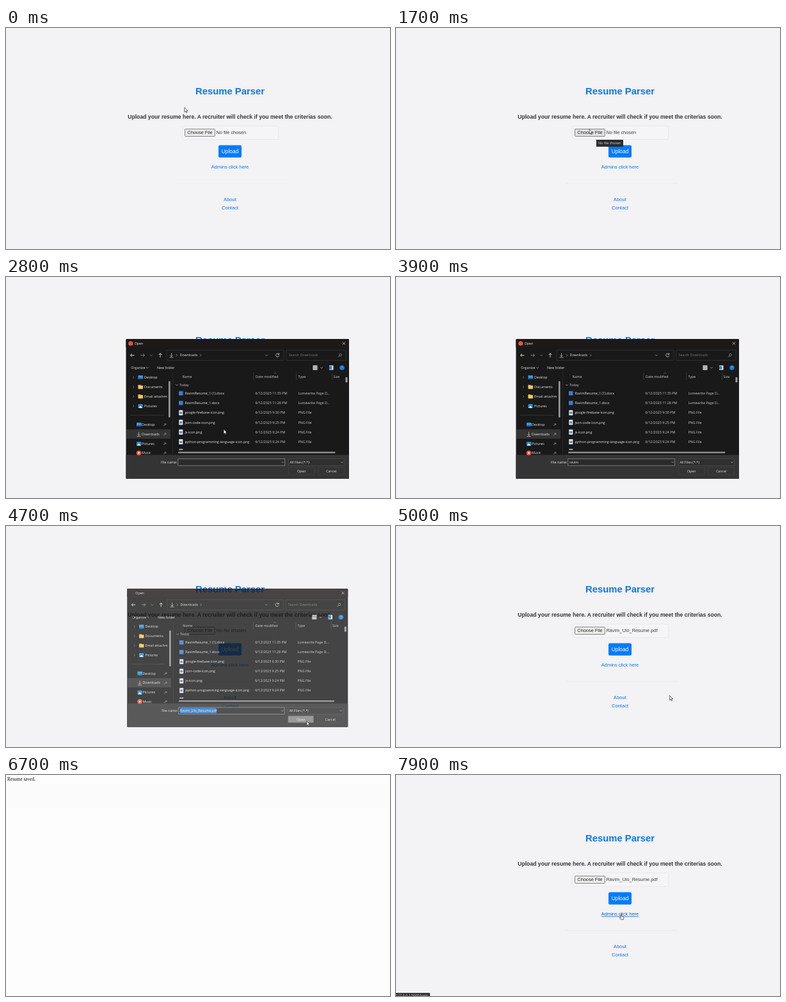
Recreate the animation shown at these times as an HTML page. Size 600 by 346 pixels, loop 8000 ms.

```html
<!DOCTYPE html>
<html lang="en">
<head>
<meta charset="utf-8">
<title>Resume Parser</title>
<style>
html, body { margin: 0; width: 100%; height: 100%; overflow: hidden; background: #f3f2f4; }
svg { display: block; width: 100vw; height: 100vh; }
.arial { font-family: "Liberation Sans", Arial, sans-serif; }
.ui { font-family: "Open Sans", "Noto Sans", sans-serif; font-size: 5.35px; }
.serif { font-family: "Liberation Serif", serif; }
text { white-space: pre; }
</style>
</head>
<body>
<svg id="stage" viewBox="0 0 600 346"></svg>
<script>
const LOOP = 8000, STEP = 100;
const FILE = 'Ravim_Ulo_Resume.pdf', TYPED = 'ravim';
const BLUE = '#0a78ee';

const attrs = o => Object.entries(o).map(([k, v]) => ` ${k}="${v}"`).join('');
const text = (x, y, s, o = {}) => `<text x="${x}" y="${y}"${attrs(o)}>${s}</text>`;
const rect = (x, y, w, h, fill, o = {}) =>
  `<rect x="${x}" y="${y}" width="${w}" height="${h}" fill="${fill}"${attrs(o)}/>`;
const line = (d, stroke, w = .6) => `<path d="${d}" fill="none" stroke="${stroke}" stroke-width="${w}"/>`;
const group = (id, body, o = {}) => `<g id="${id}"${attrs(o)}>${body}</g>`;
const circle = (x, y, r, fill) => `<circle cx="${x}" cy="${y}" r="${r}" fill="${fill}"/>`;
const right = (x, y, c = '#bbb') => line(`M${x - 1} ${y - 2}l2 2-2 2`, c);
const down = (x, y, c = '#bbb') => line(`M${x - 2} ${y - 1}l2 2 2-2`, c);

function page() {
  const mid = (y, s, size, o = {}) =>
    text(350, y, s, { 'text-anchor': 'middle', 'font-size': size, fill: BLUE, ...o });
  return rect(0, 0, 600, 346, '#f3f2f4') +
    mid(103.5, 'Resume Parser', 14.85, { 'font-weight': 700 }) +
    mid(142, 'Upload your resume here. A recruiter will check if you meet the criterias soon.',
      8.65, { 'font-weight': 700, fill: '#333336' }) +
    rect(275.7, 153.5, 150, 21, '#f5f4f6', { rx: 2, stroke: '#e3e2e5', 'stroke-width': .6 }) +
    rect(279.6, 158.2, 46.8, 11.4, '#efefef', { id: 'choose', rx: 1, stroke: '#606063', 'stroke-width': .8 }) +
    text(283.3, 166.4, 'Choose File', { 'font-size': 7.4, fill: '#222' }) +
    text(328.4, 166.4, '', { id: 'chosen', 'font-size': 7.4, fill: '#3c3c40' }) +
    rect(332, 183.5, 36, 19.3, '#007bff', { id: 'upload', rx: 2.2 }) +
    mid(195.6, 'Upload', 8.45, { fill: '#fff' }) +
    mid(220.4, 'Admins click here', 7.45, { id: 'admins' }) +
    line('M265 243.2H440', '#e5e4e7') +
    mid(270.7, 'About', 7.6) + mid(284, 'Contact', 7.6);
}

function folderIcon(kind, x, y) {
  return {
    desktop: () => rect(x - 3.5, y - 3, 7.5, 6, '#2f9be0', { rx: .8 }) + rect(x - 3.5, y + 1, 7.5, 2, '#1766ad', { rx: .5 }),
    folder: () => rect(x - 3.5, y - 3.2, 4, 3, '#d89a2b', { rx: .5 }) + rect(x - 3.5, y - 2.2, 7.5, 5.4, '#f4c659', { rx: .6 }),
    pictures: () => rect(x - 3.5, y - 3, 7.2, 6.3, '#258ee0', { rx: .8 }) + `<path d="M${x - 3} ${y + 3}l3-3.5 3.2 3.5z" fill="#e8f4ff"/>`,
    downloads: () => line(`M${x} ${y - 3.5}v5.5m-2.2-2l2.2 2.2 2.2-2.2M${x - 3} ${y + 3.5}h6`, '#bbb', .8),
    music: () => circle(x, y, 3.8, '#e9593f') + circle(x, y, 1.4, '#ffe0d5')
  }[kind]();
}

function navPane() {
  const item = (kind, name, y, pinned) => folderIcon(kind, pinned ? 207.5 : 210, y) +
    text(pinned ? 212 : 216, y + 1.9, name) +
    (pinned ? line(`M246.3 ${y + 2}l2-2m-1-1.5l2.5 2.5m-1.2-3l2 2`, '#aaa', .8) : right(199, y, '#888'));
  return rect(188, 238.5, 69, 14.6, '#343434') +
    item('desktop', 'Desktop', 157) + item('folder', 'Documents', 172) +
    item('folder', 'Email attachm', 187) + item('pictures', 'Pictures', 202) +
    line('M194 216.3H247', '#444') +
    item('desktop', 'Desktop', 231, true) + item('downloads', 'Downloads', 246, true) +
    item('pictures', 'Pictures', 261, true) + item('music', 'Music', 275.5, true) +
    rect(254, 163, 2.6, 57, '#9a9a9a', { rx: 1.3 });
}

function fileList() {
  const doc = 'Lumewrite Page D...', png = 'PNG File';
  const rows = [
    ['RavimResume_1 (1).docx', '11:35', doc], ['RavimResume_1.docx', '11:28', doc],
    ['google-firebase-icon.png', '9:30', png], ['json-code-icon.png', '9:25', png],
    ['js-icon.png', '9:24', png], ['python-programming-language-icon.png', '9:24', png]
  ];
  const icon = (type, y) => type === doc
    ? rect(270, y - 3.3, 6.6, 6.6, '#3d7bcb')
    : rect(270.3, y - 4, 6, 8, '#eee', { rx: .5 }) + rect(271.5, y - 1.4, 3.6, 3.2, '#3d83cc');
  return down(267, 169) + text(271, 171, 'Today', { fill: '#ccc' }) +
    rows.map(([name, time, type], i) => {
      const y = 182 + i * 15.2;
      return icon(type, y) + text(279.4, y + 1.9, name) +
        text(389.5, y + 1.9, `6/12/2023 ${time} PM`, { fill: '#ccc' }) +
        text(456.5, y + 1.9, type, { fill: '#ccc' });
    }).join('') +
    rect(270.3, 269.3, 6, 1.4, '#ddd') +
    rect(530.5, 157, 3, 8, '#9a9a9a');
}

function toolbar() {
  return rect(251, 114.5, 183, 16, '#191919', { stroke: '#3c3c3c', 'stroke-width': .6 }) +
    rect(438, 114.5, 93, 16, '#191919', { stroke: '#3c3c3c', 'stroke-width': .6 }) +
    line('M200.5 122.5h-6m2.5-2.5l-2.5 2.5 2.5 2.5', '#ddd', .9) +
    line('M210.5 122.5h6m-2.5-2.5l2.5 2.5-2.5 2.5', '#888', .9) +
    down(227, 122.5, '#aaa') +
    line('M241 126v-6.5m-2.5 2.5l2.5-2.5 2.5 2.5', '#ddd', .9) +
    folderIcon('downloads', 258.5, 122.5) + right(266.7, 122.5) +
    text(271.5, 124.4, 'Downloads') + right(304, 122.5) + down(407, 122.5) +
    line('M426.4 121a2.6 2.6 0 1 0 .3 2.4M426.8 119.3v2h-2', '#ddd', .8) +
    text(441.5, 124.4, 'Search Downloads', { fill: '#777' }) +
    `<circle cx="522.5" cy="122" r="1.8" fill="none" stroke="#aaa" stroke-width=".7"/>` + line('M521 123.5l-2 2', '#aaa', .7) +
    text(195.3, 144, 'Organize') + down(221, 142) + text(236, 144, 'New folder') +
    rect(479.5, 138.5, 7, 7, '#ddd') + line('M480 140.8h6m-6 2.4h6', '#333') + down(493, 142);
}

function bottomControls() {
  const button = (x, w, name, id) => rect(x, 298, w, 11, '#333', { id, stroke: '#484848', 'stroke-width': .5 }) +
    text(x + w / 2, 305.8, name, { 'text-anchor': 'middle' });
  return text(242, 291.8, 'File name:') +
    rect(268.8, 284.8, 167, 10.4, '#2b2b2b', { stroke: '#999', 'stroke-width': .7 }) +
    rect(270.8, 286, 57.5, 8, '#2b7cd3', { id: 'selection' }) +
    text(271.2, 291.8, '', { id: 'fileName' }) + down(432.5, 290) +
    rect(441.5, 284.8, 87, 10.4, '#2f2f2f', { stroke: '#555', 'stroke-width': .5 }) +
    text(443.5, 291.8, 'All Files (*.*)') + down(525, 290) +
    button(441.5, 40.5, 'Open', 'openButton') + button(488, 40.5, 'Cancel', 'cancelButton');
}

function dialog() {
  const blanks = [[187.5, 110.5, 348.5, 24.5], [242, 286, 25.3, 7.3], [269, 285, 167, 10],
    [441.5, 285, 87, 10], [441.5, 297.7, 40.5, 12.3], [487.5, 297.7, 41, 12.3], [528, 308, 8, 6]];
  return rect(187.5, 97, 348.5, 219, '#191919', { rx: 1.5 }) +
    rect(187.5, 97, 348.5, 13.5, '#1e1919', { rx: 1.5 }) +
    rect(187.5, 278.5, 348.5, 37.5, '#343434', { rx: 1.5 }) +
    group('titleIcon', circle(194.7, 104, 3.6, '#e2593f')) +
    text(200.7, 106, 'Open') +
    line('M525.8 101.7l4.4 4.4m0-4.4l-4.4 4.4', '#ccc', .7) +
    rect(505, 138.5, 6.5, 7, '#eee') + rect(505, 139.5, 4.3, 5, '#2f7fc4') +
    circle(525, 142, 3.8, '#1878d8') +
    text(525, 144, '?', { 'text-anchor': 'middle' }) +
    line('M260.5 149V278', '#303030') + line('M387 149.5v11.5M453.7 149.5v11.5M509.5 149.5v11.5', '#4a4a4a') +
    line('M418.5 151.5l2-1.7 2 1.7', '#999', .5) +
    text(275.5, 157.7, 'Name', { fill: '#ccc' }) + text(390, 157.7, 'Date modified', { fill: '#ccc' }) +
    text(456.5, 157.7, 'Type', { fill: '#ccc' }) + text(511.5, 157.7, 'Size', { fill: '#ccc' }) +
    rect(269, 273.6, 245.5, 2.4, '#8c8c8c', { rx: 1 }) +
    text(380.5, 174.2, 'Working on it...', { id: 'working' }) +
    group('controls', toolbar() + bottomControls()) +
    group('nav', navPane()) + group('files', fileList()) +
    group('blanks', blanks.map(b => rect(...b, '#fff')).join(''));
}

const stage = document.getElementById('stage');
stage.innerHTML =
  group('page', page(), { class: 'arial' }) +
  group('tooltip', rect(313, 175, 42, 10.8, '#2a2a2c') +
    text(316, 182.3, 'No file chosen', { fill: '#ddd' }), { class: 'ui' }) +
  group('dialog', dialog(), { class: 'ui', fill: '#e6e6e6' }) +
  group('saved', rect(0, 0, 600, 346, '#fefdfe') + rect(0, 14, 600, 38, '#fcfbfc') +
    text(2, 9, 'Resume saved.', { 'font-size': 7.35, fill: '#111' }), { class: 'serif' }) +
  group('status', rect(0, 341.2, 53, 5, '#2a2a2c') +
    text(0, 346.6, '127.0.0.1:5000/login', { fill: '#ddd' }), { class: 'ui' }) +
  group('arrow', '<path d="M0 0V7.2L1.7 5.7 2.8 8.1 4 7.6 2.9 5.2H5z" fill="#fff" stroke="#222" stroke-width=".7"/>') +
  group('beam', line('M-1.6-4H1.6M0-4V4M-1.6 4H1.6', '#222', .8)) +
  group('hand', '<path d="M-.8-3.8q.8-.8 1.4 0v3l2.6.6q1 .3.8 1.4l-.6 3H-.8l-2-3q.2-1 1.2-.4l.8.6z" fill="#fff" stroke="#222" stroke-width=".7"/>');

const el = {};
stage.querySelectorAll('[id]').forEach(e => el[e.id] = e);

// Pointer stops: time, x, y
const path = [
  [0, 279, 124.5], [100, 279, 124.5], [200, 280, 125], [500, 280, 125], [1300, 302, 158.5], [2000, 302, 158.5],
  [2300, 350.3, 187], [2500, 350.3, 187], [3100, 330, 290], [4400, 400, 284], [4600, 469.8, 305.5],
  [4800, 469.8, 305.5], [5300, 350, 192], [5600, 350, 192], [6000, 22.5, 5], [6200, 22.5, 5],
  [6600, 8, -12], [7400, 8, -12], [7800, 352, 222], [8000, 352, 222]
];

function pointerAt(t) {
  const i = path.findIndex(p => p[0] > t);
  const [t0, x0, y0] = path[i - 1], [t1, x1, y1] = path[i];
  const u = (t - t0) / (t1 - t0), k = u * u * (3 - 2 * u);
  return [x0 + (x1 - x0) * k, y0 + (y1 - y0) * k];
}

const show = (name, on) => el[name].setAttribute('display', on ? 'inline' : 'none');
const fill = (name, color) => el[name].setAttribute('fill', color);

function render(time) {
  const t = Math.floor(time % LOOP / STEP) * STEP;
  const within = (a, b) => t >= a && t < b;
  const [x, y] = pointerAt(t);
  const over = (a, b, c, d) => x >= a && x <= c && y >= b && y <= d;

  const saved = within(5600, 7400), open = within(2300, 4800);
  const picked = t >= 4400, closing = t >= 4700;

  show('saved', saved);
  show('tooltip', within(1500, 2100));
  el.chosen.textContent = t >= 4800 ? FILE : 'No file chosen';
  fill('choose', !open && over(279, 158, 327, 170) ? '#e3e3e5' : '#efefef');
  fill('upload', !open && over(332, 183, 368, 203) ? '#0069d9' : '#007bff');
  const linkHover = t >= 7800;
  fill('admins', linkHover ? '#0a5fbe' : BLUE);
  el.admins.setAttribute('text-decoration', linkHover ? 'underline' : 'none');
  show('status', linkHover);

  show('dialog', open);
  el.dialog.setAttribute('opacity', closing ? .8 : 1);
  el.dialog.setAttribute('transform', closing ? 'translate(361.8 206.5) scale(.99) translate(-361.8 -206.5)' : '');
  show('titleIcon', !closing);
  show('blanks', t < 2400);
  show('controls', t >= 2400);
  show('nav', t >= 2500);
  show('working', t < 2600);
  show('files', t >= 2600);
  const typed = Math.max(0, Math.min(TYPED.length, Math.round((t - 3100) / 80)));
  el.fileName.textContent = picked ? FILE : TYPED.slice(0, typed);
  show('selection', picked);
  fill('openButton', open && over(441, 298, 482, 309) ? '#858585' : '#333');

  const hidden = within(3200, 4400);
  const kind = linkHover ? 'hand'
    : (saved && x < 48 && y < 12) || (open && over(269, 285, 436, 295)) ? 'beam' : 'arrow';
  for (const name of ['arrow', 'beam', 'hand']) {
    show(name, !hidden && name === kind);
    el[name].setAttribute('transform', `translate(${x} ${y})`);
  }
}

const start = performance.now();
function tick() {
  render(performance.now() - start);
  requestAnimationFrame(tick);
}
tick();
</script>
</body>
</html>
```
